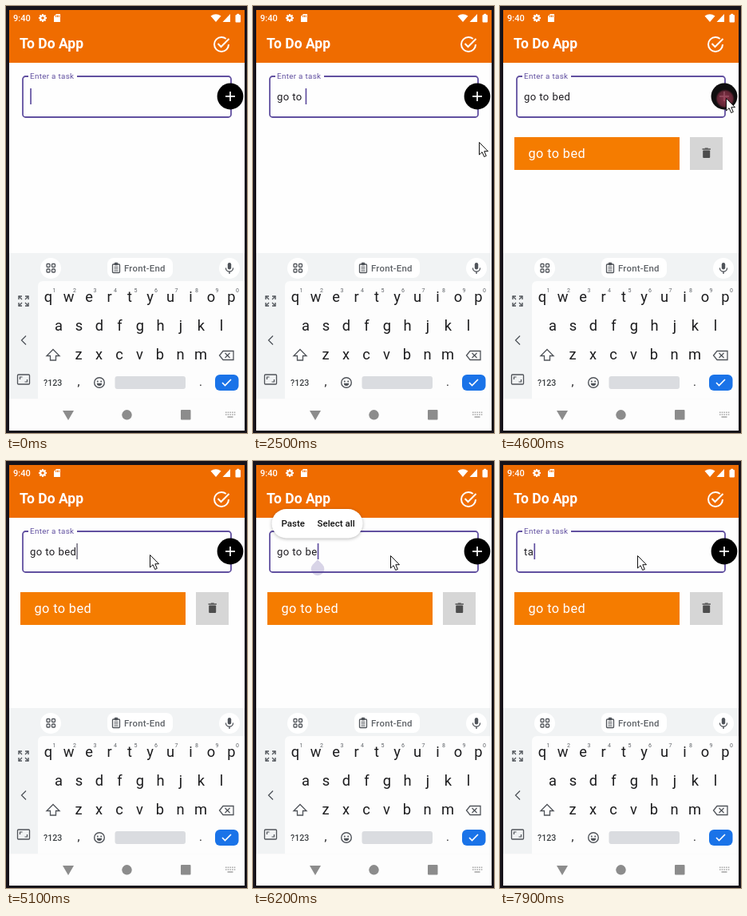
An HTML page with a canvas for the animation above (8 s loop, 302 by 534 pixels).

```html
<!DOCTYPE html>
<html lang="en">
<head>
<meta charset="utf-8">
<title>To Do App</title>
<style>
html, body { margin: 0; width: 100%; height: 100%; overflow: hidden; background: #17131a; }
canvas { display: block; width: 302px; height: 534px; }
</style>
</head>
<body>
<canvas id="stage"></canvas>
<script>
const W = 302, H = 534, LOOP = 8000;
const canvas = document.getElementById('stage');
const ctx = canvas.getContext('2d');
const dpr = window.devicePixelRatio || 1;
canvas.width = W * dpr;
canvas.height = H * dpr;

const PURPLE = '#6150a0', GREY = '#50545a';

// Keyed states: each holds until the next one starts.
const TYPED = [[0, ''], [800, 'go'], [1800, 'go '], [2100, 'go t'], [2300, 'go to'],
  [2500, 'go to '], [2800, 'go to b'], [2900, 'go to be'], [3000, 'go to bed'],
  [6100, 'go to be'], [6600, 'go to b'], [6700, 'go to'], [6800, 'go t'],
  [6900, 'go'], [7000, ''], [7700, 't'], [7800, 'ta']];
const CARET = [[0, 1], [300, 0], [800, 1], [1100, 0], [1700, 1], [3500, 0], [4000, 1],
  [4500, 0], [5000, 1], [7400, 0], [7700, 1]];
const POINTER = [[0, null], [1400, [283, 170]], [3600, [283, 164]], [3700, [283, 150]],
  [3800, [283, 137]], [3900, [283, 125]], [4000, [283, 119]], [4100, [283, 115]],
  [4800, [270, 113]], [4900, [240, 110]], [5000, [205, 113]], [5100, [180, 117]],
  [5200, [172, 118]]];
const PRESS = [[0, 0], [4500, 0.5], [4600, 1], [4700, 0.7], [4800, 0.35], [4900, 0]];
const HANDLE = [[0, 0], [5400, 1], [6100, 0.6], [6200, 0.24], [6300, 0]];
const POPUP = [[0, 0], [5600, 0.6], [5700, 1], [6900, 0.5], [7000, 0]];

function at(keys, t) {
  let value = keys[0][1];
  for (const [start, v] of keys) if (t >= start) value = v;
  return value;
}

function setFont(size, weight = 400, spacing = 0) {
  ctx.font = `${weight} ${size}px Roboto, sans-serif`;
  ctx.letterSpacing = spacing + 'px';
}

function text(str, x, y, size, color, { weight = 400, spacing = 0, align = 'left' } = {}) {
  setFont(size, weight, spacing);
  ctx.textAlign = align;
  ctx.fillStyle = color;
  ctx.fillText(str, x, y);
}

function rect(x, y, w, h, color, r = 0) {
  ctx.fillStyle = color;
  ctx.beginPath();
  ctx.roundRect(x, y, w, h, r);
  ctx.fill();
}

function frame(x, y, w, h, color, width, r = 0) {
  ctx.strokeStyle = color;
  ctx.lineWidth = width;
  ctx.beginPath();
  ctx.roundRect(x, y, w, h, r);
  ctx.stroke();
}

function disc(x, y, r, color) {
  ctx.fillStyle = color;
  ctx.beginPath();
  ctx.arc(x, y, r, 0, 7);
  ctx.fill();
}

function arc(x, y, r, a, b, color, width) {
  ctx.strokeStyle = color;
  ctx.lineWidth = width;
  ctx.beginPath();
  ctx.arc(x, y, r, a, b);
  ctx.stroke();
}

function trace(points) {
  ctx.beginPath();
  for (let i = 0; i < points.length; i += 2) ctx.lineTo(points[i], points[i + 1]);
}

function line(points, color, width) {
  trace(points);
  ctx.strokeStyle = color;
  ctx.lineWidth = width;
  ctx.stroke();
}

function poly(points, color) {
  trace(points);
  ctx.closePath();
  ctx.fillStyle = color;
  ctx.fill();
}

function statusBar() {
  text('9:40', 9, 19, 11, '#fff', { weight: 500 });
  for (let i = 0; i < 8; i++) {
    const a = i * Math.PI / 4, c = Math.cos(a), s = Math.sin(a);
    line([46 + c * 3, 15 + s * 3, 46 + c * 5, 15 + s * 5], '#fff', 2);
  }
  arc(46, 15, 2.8, 0, 7, '#fff', 2);
  poly([63, 10, 68, 10, 68, 20, 60, 20, 60, 13], '#fff');
  for (let i = 0; i < 3; i++) rect(62.2 + i * 1.8, 11.5, 1, 2.5, '#ef6c00');

  ctx.fillStyle = '#fff';
  ctx.beginPath();
  ctx.moveTo(263, 20);
  ctx.lineTo(256.5, 12.5);
  ctx.quadraticCurveTo(263, 8, 269.5, 12.5);
  ctx.fill();
  poly([281, 10, 281, 20, 271.5, 20], '#fff');
  rect(287.5, 11, 6.5, 9.5, '#fff', 1);
  rect(289.2, 9.8, 3, 2, '#fff');
}

function appBar() {
  rect(4, 5, 295, 66, '#ef6c00');
  statusBar();
  text('To Do App', 17, 53.3, 17.5, '#fff', { weight: 700 });
  arc(270, 48, 9, 0, Math.PI * 1.72, '#fff', 2);
  line([265.5, 47, 269.5, 51, 279.5, 41], '#fff', 2);
}

function field() {
  frame(21, 88, 261, 51, PURPLE, 1.8, 3.5);
  rect(28, 85, 61, 5, '#fefefe');
  text('Enter a task', 30, 91, 9.8, PURPLE, { spacing: 0.33 });
}

function task() {
  rect(18, 164, 207, 41, '#f57c00');
  text('go to bed', 35.5, 190, 16.3, '#fff', { spacing: 0.4 });
  rect(238, 164, 41, 41, '#d6d6d6');
  rect(254.2, 180.5, 9, 9.5, '#4d4d4d', 1);
  rect(253.5, 178.3, 10.4, 1.4, '#4d4d4d');
  rect(256.7, 177.5, 4, 1.2, '#4d4d4d');
}

function addButton(press) {
  disc(281, 113, 16.4, '#000');
  line([275, 113, 287, 113], '#fff', 1.7);
  line([281, 107, 281, 119], '#fff', 1.7);
  if (!press) return;
  ctx.save();
  ctx.globalAlpha = press;
  disc(281, 113, 16.4, 'rgba(45,40,45,.35)');
  const glow = ctx.createRadialGradient(282, 116, 2, 282, 116, 12);
  glow.addColorStop(0, 'rgba(150,55,80,.85)');
  glow.addColorStop(0.75, 'rgba(125,45,65,.75)');
  glow.addColorStop(1, 'rgba(90,30,45,0)');
  disc(282, 115.5, 12, glow);
  ctx.restore();
}

function toolbarStrip() {
  disc(56, 328, 13, '#fff');
  for (const x of [51, 57.5]) for (const y of [322.5, 329]) frame(x, y, 4, 4, GREY, 1.3, 1);

  rect(127, 315, 82, 25, '#fff', 8);
  frame(133.5, 323, 9, 10.5, GREY, 1.3, 1);
  rect(135.8, 320.8, 4.4, 3.6, GREY, 1);
  for (const y of [326.5, 328.7, 331]) line([135.5, y, 140.5, y], GREY, 1);
  text('Front-End', 148, 332, 11.4, '#5f6368', { weight: 500, spacing: 0.25 });

  disc(280, 328, 13, '#fff');
  rect(277.8, 321, 4.4, 8.5, GREY, 2.2);
  arc(280, 327.5, 4.6, 0, Math.PI, GREY, 1.3);
  line([280, 332, 280, 335], GREY, 1.4);
}

function sidePanel() {
  for (const sx of [-1, 1]) for (const sy of [-1, 1]) {
    const x = 22 + sx * 6, y = 369 + sy * 6;
    line([x - sx * 4, y, x, y, x, y - sy * 4], GREY, 1.4);
    line([x, y, x - sx * 4, y - sy * 4], GREY, 1.2);
  }
  line([25, 412.5, 19.5, 418, 25, 423.5], GREY, 1.3);
  frame(14.5, 461, 15, 12, GREY, 1.3, 1);
  line([17.5, 467, 17.5, 464, 20.5, 464], GREY, 1.2);
  line([23.5, 470, 26.5, 470, 26.5, 467], GREY, 1.2);
}

function keyRow(keys, x, y) {
  [...keys].forEach((key, i) =>
    text(key, x + i * 25.5, y, 18.3, '#1c1c1e', { align: 'center' }));
}

function keys() {
  keyRow('qwertyuiop', 53, 370);
  [...'1234567890'].forEach((n, i) =>
    text(n, 60.5 + i * 25.5, 357.5, 7, '#5f6368', { align: 'center' }));
  keyRow('asdfghjkl', 66, 406);
  keyRow('zxcvbnm', 91, 442);

  trace([59, 429.5, 67, 437.5, 62.5, 437.5, 62.5, 443, 55.5, 443, 55.5, 437.5, 51, 437.5]);
  ctx.closePath();
  ctx.strokeStyle = GREY;
  ctx.lineWidth = 1.3;
  ctx.stroke();

  trace([267.5, 437, 272, 431.5, 285, 431.5, 285, 442.5, 272, 442.5]);
  ctx.closePath();
  ctx.stroke();
  line([274.5, 434, 280.5, 440], GREY, 1.3);
  line([280.5, 434, 274.5, 440], GREY, 1.3);

  text('?123', 47, 475, 10.6, '#3c4043', { weight: 500 });
  text(',', 91, 475, 15, '#1c1c1e', { align: 'center' });
  text('.', 244, 475, 15, '#1c1c1e', { align: 'center' });
  arc(117, 471, 6.3, 0, 7, GREY, 1.4);
  disc(114.8, 469.4, 1, GREY);
  disc(119.2, 469.4, 1, GREY);
  ctx.fillStyle = GREY;
  ctx.beginPath();
  ctx.arc(117, 471.8, 3.2, 0, Math.PI);
  ctx.fill();
  rect(136.5, 463, 88.5, 16, '#dadce0', 3);
  rect(262, 461, 29.5, 20, '#1a73e8', 6);
  line([271, 471, 274.5, 474.5, 282, 467], '#fff', 1.6);
}

function navBar() {
  rect(4, 491.5, 295, 39.5, '#fdfdfd');
  poly([71, 506, 85, 506, 78, 518], '#8c8c8c');
  disc(151.5, 511.3, 6.2, '#8c8c8c');
  rect(219, 505, 12.5, 12.5, '#8c8c8c', 1);
  for (let row = 0; row < 2; row++)
    for (let i = 0; i < 5; i++) rect(275 + i * 2.7, 507.5 + row * 2.7, 1.5, 1.5, '#a4a4a4');
  rect(277.5, 513.2, 7, 1.5, '#a4a4a4');
}

function keyboard() {
  rect(4, 309, 295, 182.5, '#f1f3f4');
  rect(40, 344, 259, 147.5, '#fdfdfd', [6, 0, 0, 0]);
  toolbarStrip();
  sidePanel();
  keys();
  navBar();
}

function handle(x, alpha) {
  ctx.save();
  ctx.globalAlpha = alpha;
  ctx.translate(x, 135);
  ctx.rotate(Math.PI / 4);
  rect(-8.3, -8.3, 16.6, 16.6, PURPLE, [0, 8.3, 8.3, 8.3]);
  ctx.restore();
}

function popup(caretX, alpha) {
  const x = Math.max(11, caretX - 58);
  ctx.save();
  ctx.globalAlpha = alpha;
  ctx.shadowColor = 'rgba(0,0,0,.28)';
  ctx.shadowBlur = 4 * dpr;
  ctx.shadowOffsetY = dpr;
  rect(x, 60, 114, 36.5, '#fff', 18.2);
  ctx.shadowColor = 'transparent';
  text('Paste', x + 12, 82, 11.5, '#111', { weight: 500 });
  text('Select all', x + 57, 82, 11.5, '#111', { weight: 500 });
  ctx.restore();
}

function pointer([x, y]) {
  ctx.save();
  ctx.translate(x + 0.5, y + 0.5);
  trace([0, 0, 0, 15.5, 3.6, 12.2, 6.2, 18, 8.8, 16.9, 6.3, 11.2, 11, 11.2]);
  ctx.closePath();
  ctx.fillStyle = '#fff';
  ctx.fill();
  ctx.strokeStyle = '#111';
  ctx.lineWidth = 1;
  ctx.stroke();
  ctx.restore();
}

function draw(t) {
  ctx.setTransform(dpr, 0, 0, dpr, 0, 0);
  rect(0, 0, W, H, '#17131a');
  rect(4, 5, 295, 526, '#fefefe');
  appBar();
  field();

  const typed = at(TYPED, t);
  text(typed, 30, 118, 13.1, '#1d1b20', { spacing: 0.41 });
  const caretX = 31 + ctx.measureText(typed).width;
  if (at(CARET, t)) {
    const thin = t >= 5000 && t < 6100;
    rect(caretX - 0.8, 103, thin ? 1.1 : 1.7, 20, thin ? '#38324a' : PURPLE);
  }

  if (t >= 4600) task();
  addButton(at(PRESS, t));
  keyboard();

  const grip = at(HANDLE, t), menu = at(POPUP, t), mouse = at(POINTER, t);
  if (grip) handle(caretX - 0.5, grip);
  if (menu) popup(caretX, menu);
  if (t >= 5600 && t < 5800) disc(172, 119.5, 2.5, 'rgba(225,120,150,.55)');
  if (mouse) pointer(mouse);
}

function tick() {
  draw(performance.now() % LOOP);
  requestAnimationFrame(tick);
}
tick();
</script>
</body>
</html>
```
